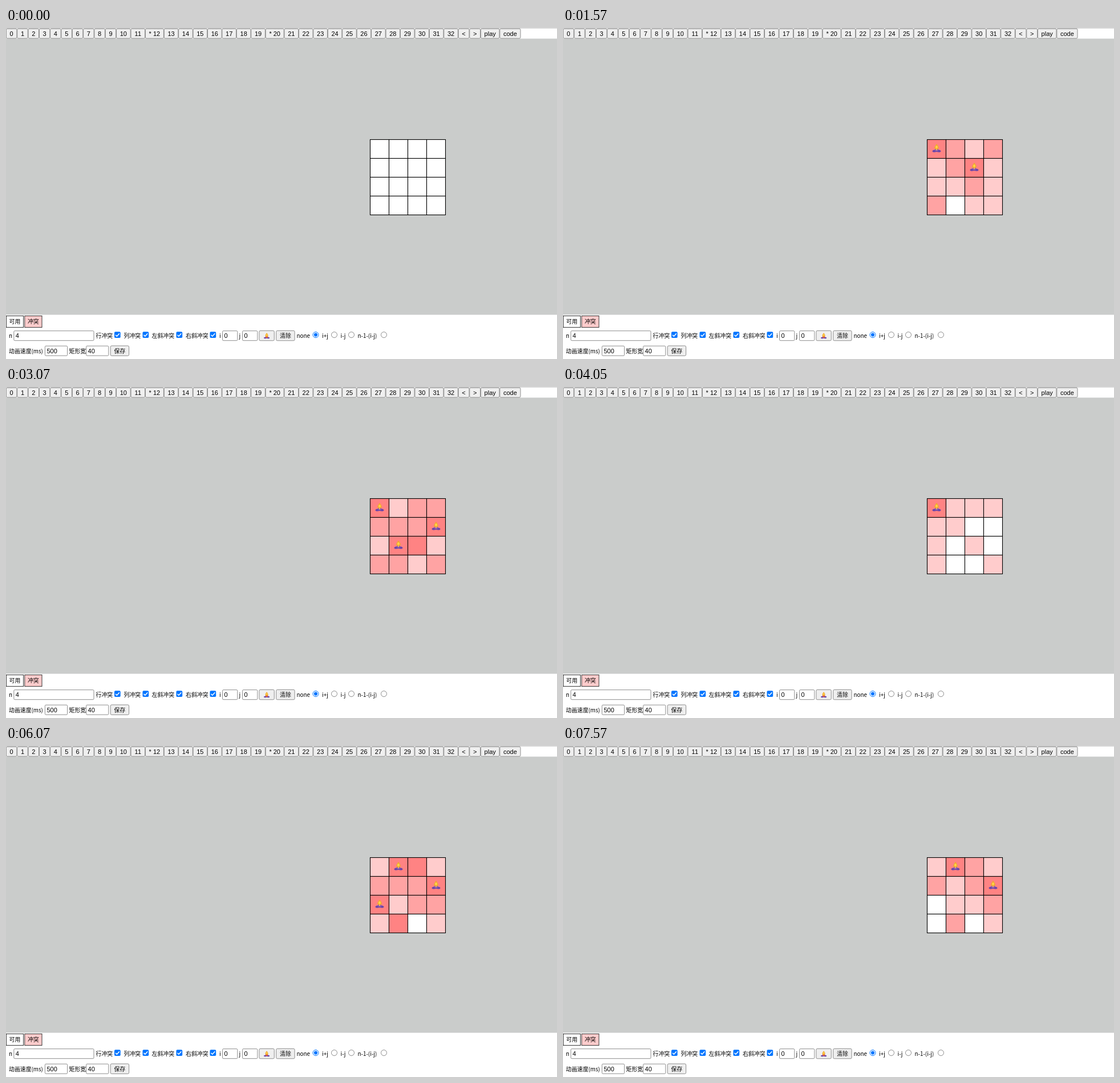
An HTML page for the animation above (8 s loop, 966 by 580 pixels).

```html
<!DOCTYPE html>
<html lang="zh">
<head>
<meta charset="utf-8">
<title>N 皇后</title>
<style>
  html, body { margin: 0; width: 100%; height: 100%; overflow: hidden; background: #fff; }
  svg { display: block; width: 966px; height: 580px; }
  text { font: 9.9px "Noto Sans CJK SC", "Noto Sans CJK", "Noto Sans", sans-serif; fill: #000; white-space: pre; }
  .arial { font: 11px "Liberation Sans", Arial, sans-serif; }
  .mid { text-anchor: middle; }
  .button { fill: #efefef; stroke: #767676; stroke-width: .825; }
  .button.hover { fill: #e5e5e5; stroke: #4f4f4f; }
  .button.active { fill: #f5f5f5; stroke: #8d8d8d; }
  .field { fill: #fff; stroke: #767676; stroke-width: .825; }
  .legend { stroke: #222; stroke-width: .9; }
  .check { fill: #0075ff; }
  .tick { fill: none; stroke: #fff; stroke-width: 1.6; }
  .cell { fill: #fff; stroke: #000; stroke-width: 1.1; }
</style>
</head>
<body>
<svg id="stage" viewBox="0 0 966 580">
  <defs>
    <symbol id="queen" viewBox="0 0 16 16" overflow="visible">
      <path d="M.4 13.2Q1 11 4.5 10.8L11.5 10.8Q15 11 15.6 13.2Q15 15.4 11 14.8L8 14.2L5 14.8Q1 15.4.4 13.2Z" fill="#6a46a8"/>
      <path d="M5 8.6Q8 7.4 11 8.6L10.6 13H5.4Z" fill="currentColor"/>
      <path d="M8 .4L10 3Q12.4 6 11.4 9L10 9.6H6L4.6 9Q3.6 6 6 3Z" fill="#f0a92b"/>
      <ellipse cx="8" cy="5.8" rx="2" ry="2.6" fill="#ffd04d"/>
      <path d="M6.6 9.4H9.4L8 12.6Z" fill="#ffc83d"/>
    </symbol>
  </defs>
  <rect width="966" height="1" fill="#d4d4d4"/>
  <rect y="18.6" width="966" height="483.9" fill="#cacccb"/>
  <g id="ui"></g>
  <g id="board"></g>
  <path id="cursor" d="M0 0V11.6L2.7 9.1L4.6 13.2L6.5 12.4L4.7 8.4H8.3Z" fill="#000" stroke="#fff" stroke-width=".6"/>
</svg>
<script>
const LOOP = 8000, N = 4, CELL = 33, SCALE = 0.825;
const LEFT = 638.5, TOP = 195.5;
const $ = id => document.getElementById(id);
const ui = $('ui'), board = $('board'), cursor = $('cursor');

function add(parent, tag, attrs, content = '') {
  const el = document.createElementNS('http://www.w3.org/2000/svg', tag);
  for (const key in attrs) el.setAttribute(key, attrs[key]);
  el.textContent = content;
  parent.append(el);
  return el;
}
const label = (x, y, s, cls = '') => add(ui, 'text', { x, y, class: cls }, s);
const box = (x, y, width, height, cls, rx = 2) =>
  add(ui, 'rect', { x: x + .4, y: y + .4, width: width - .8, height: height - .8, rx, class: cls });

function button(x, y, w, h, s, cls = '') {
  const rect = box(x, y, w, h, 'button');
  label(x + w / 2, y + h / 2 + 3.9, s, 'mid ' + cls);
  return rect;
}
function field(x, y, w, s) {
  box(x, y, w, 17.8, 'field', 1.6);
  label(x + 3.4, y + 12.8, s, 'arial');
}
function checkbox(x, y) {
  add(ui, 'rect', { x, y, width: 10.7, height: 10.7, rx: 1.8, class: 'check' });
  add(ui, 'path', { d: `M${x + 2.1} ${y + 5.6}l2.3 2.3l4.4-5`, class: 'tick' });
}
function radio(cx, on) {
  add(ui, 'circle', { cx, cy: 537.6, r: 5, fill: '#fff', stroke: on ? '#0075ff' : '#767676', 'stroke-width': on ? 1 : .85 });
  if (on) add(ui, 'circle', { cx, cy: 537.6, r: 3.1, fill: '#0075ff' });
}

// Toolbar: button width is the text width plus 16 units of padding and border
const emWidth = { '*': .389, ' ': .278, '<': .584, '>': .584, l: .222, y: .5, c: .5 };
const steps = Array.from({ length: 33 }, (_, i) => (i === 12 || i === 20 ? '* ' : '') + i);
let barX = 0, play;
for (const s of [...steps, '<', '>', 'play', 'code']) {
  const w = SCALE * (16 + [...s].reduce((sum, c) => sum + 13.333 * (emWidth[c] || .556), 0));
  const rect = button(barX, 0.9, w, 17.7, s, 'arial');
  if (s === 'play') play = rect;
  barX += w;
}

// Legend
[['可用', 0, '#fff'], ['冲突', 32.4, '#fcc']].forEach(([s, x, fill]) => {
  box(x, 504, 31, 21, 'legend', 0).setAttribute('fill', fill);
  label(x + 15.4, 518.4, s, 'mid');
});

// Settings
label(5, 543, 'n');
field(13.4, 530.3, 141, '4');
[['行冲突', 157.5, 190], ['列冲突', 206.5, 239.5], ['左斜冲突', 255.5, 298.5], ['右斜冲突', 315, 357.5]]
  .forEach(([s, x, cx]) => { label(x, 543, s); checkbox(cx, 532.3); });
label(374, 543, 'i');
field(379.2, 530.3, 27, '0');
label(408.5, 543, 'j');
field(414.2, 530.3, 27, '0');
button(443.5, 530, 27.2, 18.2, '');
add(ui, 'use', { href: '#queen', x: 451.6, y: 534, width: 11, height: 11, color: '#d6453c' });
button(473.3, 530, 33.2, 18.2, '清除');
[['none', 509.5, 543], ['i+j', 554, 575.5], ['i-j', 586.5, 605.5], ['n-1-(i-j)', 616.5, 662.5]]
  .forEach(([s, x, cx], i) => { label(x, 543, s); radio(cx, i === 0); });
label(5, 569.6, '动画速度(ms)');
field(68, 556.8, 40, '500');
label(110.5, 569.6, '矩形宽');
field(140.2, 556.8, 40, '40');
button(182.8, 556.5, 33.2, 18.2, '保存');

// Board
const cells = [];
for (let i = 0; i < N * N; i++) {
  const r = Math.floor(i / N), c = i % N, x = LEFT + c * CELL, y = TOP + r * CELL;
  cells.push({ r, c, rect: add(board, 'rect', { x, y, width: CELL, height: CELL, class: 'cell' }) });
}
for (const cell of cells) {
  cell.queen = add(board, 'use', {
    href: '#queen', x: LEFT + cell.c * CELL + 8.5, y: TOP + cell.r * CELL + 7.2,
    width: 16, height: 16, color: '#8a5bb8'
  });
}

// Backtracking search: one snapshot (column per row) for every placed or lifted queen
function search() {
  const states = [[]], cols = [];
  (function place(r) {
    if (r === N) return;
    for (let c = 0; c < N; c++) {
      if (cols.some((q, i) => q === c || Math.abs(q - c) === r - i)) continue;
      cols.push(c);
      states.push([...cols]);
      place(r + 1);
      cols.pop();
      states.push([...cols]);
    }
  })(0);
  return states;
}
const states = search();
const stepTimes = [1100, 1570, 2040, 2550, 3070, 3540, 4050, 4570, 5040, 5560, 6070, 6540, 7050, 7570];

function drawBoard(cols) {
  for (const { r, c, rect, queen } of cells) {
    const hit = test => cols.some((qc, qr) => test(qr, qc)) ? 1 : 0;
    const layers = hit((qr, qc) => qr === r || qc === c)
      + hit((qr, qc) => qr + qc === r + c)
      + hit((qr, qc) => qr - qc === r - c);
    const shade = Math.round(255 * 0.8 ** layers);
    rect.style.fill = `rgb(255,${shade},${shade})`;
    queen.style.display = cols[r] === c ? '' : 'none';
  }
}

// Pointer: [time, x, y]
const moves = [[690, 875, 0], [750, 869, 4], [800, 862, 5], [860, 856, 4], [910, 852, 3], [970, 850, 3], [1060, 852, 1]];

function drawCursor(t) {
  const at = t < 1100 && moves.filter(m => m[0] <= t).pop();
  cursor.style.display = at ? '' : 'none';
  if (at) cursor.setAttribute('transform', `translate(${at[1]} ${at[2]})`);
  const over = at && at[1] < 865;
  const pressed = over && t >= 970 && t < 1060;
  play.setAttribute('class', 'button' + (pressed ? ' active' : over ? ' hover' : ''));
}

let shown = -1;
const start = performance.now();
function frame() {
  const t = Math.max(0, performance.now() - start) % LOOP;
  const step = stepTimes.filter(s => s <= t).length;
  if (step !== shown) drawBoard(states[shown = step]);
  drawCursor(t);
  requestAnimationFrame(frame);
}
frame();
</script>
</body>
</html>
```
